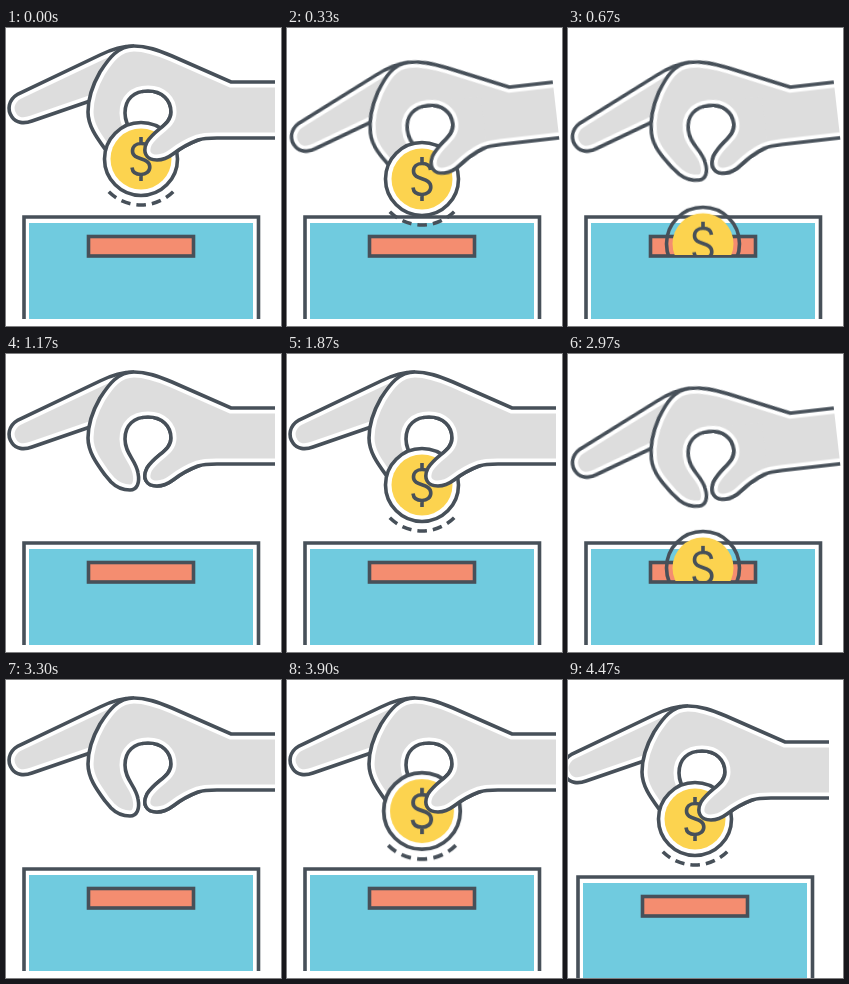
These frames come from a looping animation (275 px wide and 298 px high, 4.51 s). An HTML page:

```html
<!DOCTYPE html>
<html lang="en">
<head>
<meta charset="utf-8">
<title>Coin donation</title>
<style>
  html, body { margin: 0; width: 100%; height: 100%; overflow: hidden; background: #fff; }
  svg { display: block; width: 100vw; height: 100vh; }

  .line { fill: none; stroke: #475059; stroke-width: 3.6; }
  .skin { fill: #dddddd; }
  .inset { fill: none; stroke: #fff; stroke-width: 11; }

  .scene, .hand, .coin, .dashes { animation: 4510ms linear infinite; }
  .scene { animation-name: jolt; }
  .hand { animation-name: dip; transform-origin: 269px 82px; }
  .coin { animation-name: drop; transform-origin: 135px 131px; }
  .dashes { animation-name: blink; }

  @keyframes jolt {
    0%, 99.1% { transform: none; }
    99.11%, 100% { transform: translate(-8px, 8px); }
  }
  @keyframes dip {
    0%, 4.21%, 20.62%, 55.43%, 71.84%, 100% { transform: rotate(0deg); }
    5.76%, 56.98% { transform: rotate(-2.4deg); }
    7.32%, 15.74%, 58.54%, 66.96% { transform: rotate(-6.5deg); }
  }
  @keyframes drop {
    0%, 4.21%, 39.91%, 55.43%, 87.58%, 100% { transform: translateY(0) scale(1); }
    5.76%, 56.98% { transform: translateY(4px) scale(1); }
    7.54%, 58.76% { transform: translateY(22px) scale(1); }
    14.97%, 66.19% { transform: translateY(85.5px) scale(1); }
    18.63%, 69.84% { transform: translateY(137px) scale(1); }
    18.64%, 33.92%, 69.85%, 81.6% { transform: translateY(0) scale(0); }
    37.25%, 84.92% { transform: translateY(0) scale(1.12); }
  }
  @keyframes blink {
    0%, 8.5%, 18.64%, 59.7%, 69.85%, 100% { opacity: 1; }
    10.5%, 18.63%, 61.7%, 69.84% { opacity: 0; }
  }
</style>
</head>
<body>
<svg viewBox="0 0 275 298">
  <defs>
    <path id="palm" d="M269 54H225L166 28C152 22 141 18 128 18C112 18 103 30 94 44C86 58 82 70 82 84C82 98 91 110 99 121L105 128C111 134 118 136 124 136C131 136 134 129 132 119C130 106 119 100 119 85C119 71 128 63 142 63C156 63 165 72 165 84C165 97 150 100 141 114C136 124 140 132 151 132C158 132 163 129 167 126C176 119 184 115 192 112C198 110 204 110 211 110H269"/>
    <path id="finger" d="M128 18C115 18 104 22 94 27L12 66C2 72 1 82 6 89C10 95 18 96 26 93L84 73"/>
    <clipPath id="inPalm"><use href="#palm"/></clipPath>
    <clipPath id="inFinger"><use href="#finger"/></clipPath>
    <clipPath id="thumbArea"><rect x="136" y="60" width="60" height="80"/></clipPath>
    <clipPath id="aboveBox"><rect width="275" height="187"/></clipPath>
    <clipPath id="aboveSlotBase"><rect width="275" height="227"/></clipPath>
    <g id="palmArt">
      <use href="#palm" class="skin"/>
      <use href="#palm" class="inset" clip-path="url(#inPalm)"/>
      <use href="#palm" class="line"/>
    </g>
  </defs>

  <g class="scene">
    <!-- box -->
    <rect x="23" y="195" width="224" height="96" fill="#70cbdf"/>
    <path class="line" d="M18 291V189H252.500V291"/>
    <rect class="line" x="82.5" y="208.5" width="105" height="19.5" style="fill:#f48d70"/>

    <!-- hand behind the coin -->
    <g class="hand">
      <use href="#finger" class="skin"/>
      <use href="#finger" class="inset" clip-path="url(#inFinger)"/>
      <use href="#finger" class="line"/>
      <use href="#palmArt"/>
    </g>

    <!-- the coin's white ring stops at the box, the rest sinks into the slot -->
    <g clip-path="url(#aboveBox)">
      <circle class="coin" cx="135" cy="131" r="36.5" fill="#fff"/>
    </g>
    <g clip-path="url(#aboveSlotBase)">
      <g class="coin">
        <circle cx="135" cy="131" r="30.5" fill="#fcd34f"/>
        <path class="line" d="M143.500 122C143 117 139 115.500 135 115.500C130 115.500 126.500 118.500 126.500 123C126.500 133 143.800 128.500 143.800 139C143.800 143.500 140 146.500 135 146.500C130 146.500 126.500 144 126 139.500M135 109V116M135 146V153"/>
        <circle class="line" cx="135" cy="131" r="36.5"/>
        <path class="line dashes" stroke-dasharray="9.5 6" d="M102.800 163.800A46 46 0 0 0 167.200 163.800"/>
      </g>
    </g>

    <!-- thumb in front of the coin -->
    <g class="hand">
      <g clip-path="url(#thumbArea)"><use href="#palmArt"/></g>
    </g>
  </g>
</svg>
</body>
</html>
```
